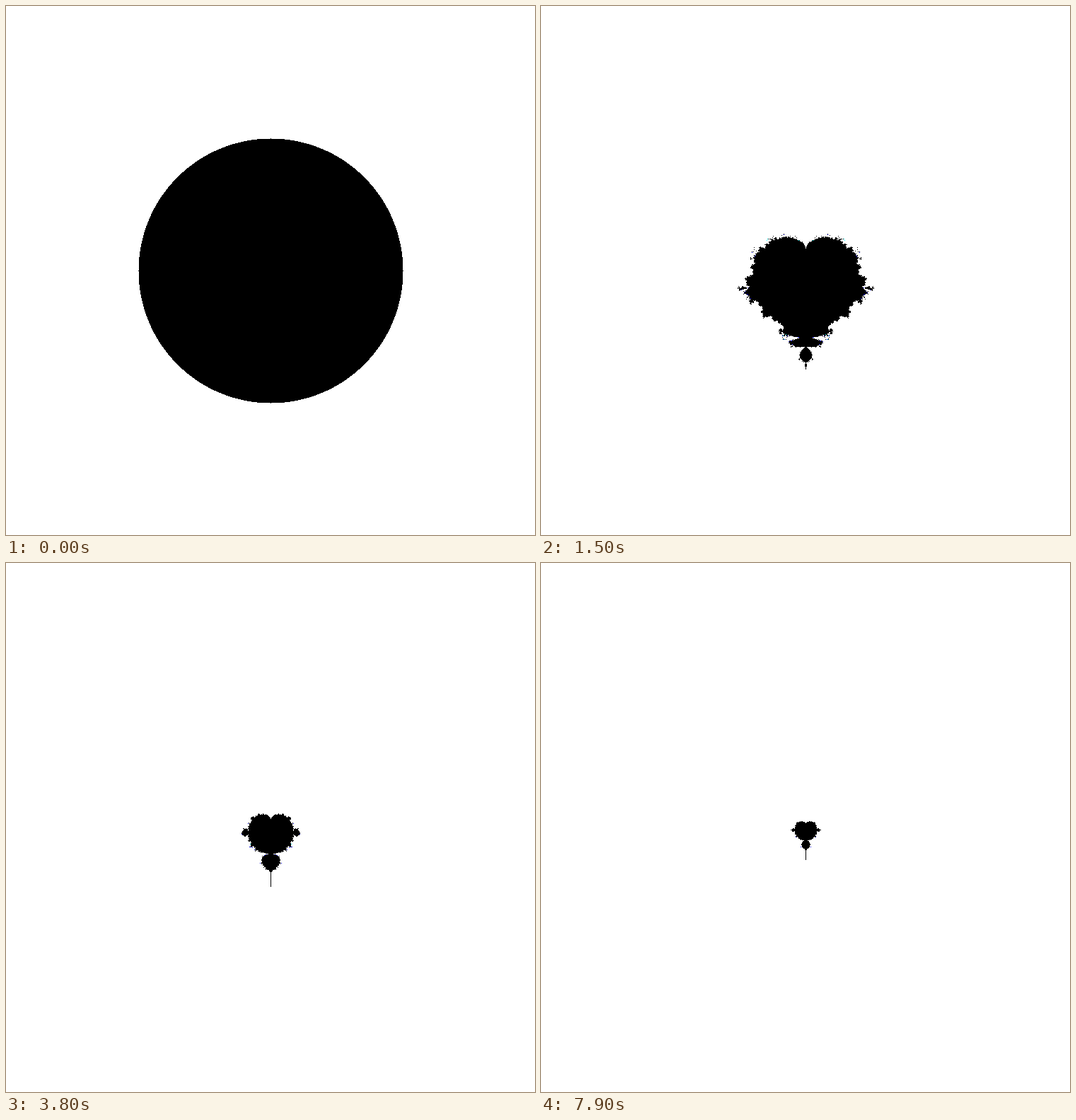
These frames come from a looping animation (748x748 px, 8 s). An HTML page with a canvas:

```html
<!DOCTYPE html>
<html lang="en">
<head>
<meta charset="utf-8">
<title>Disc to Mandelbrot</title>
<style>
  html, body { margin: 0; width: 100%; height: 100%; overflow: hidden; background: #fff; }
  canvas { display: block; width: 748px; height: 748px; }
</style>
</head>
<body>
<canvas id="stage" width="748" height="748"></canvas>
<script>
const SIZE = 748, MID = 374, UNIT = 187;
const LOOP = 8000, STEP = 100;
const RATE = 0.1;
const MAX_ITER = 50, CYAN_FROM = 46, BLUE_FROM = 47;
const REACH = 212;

const WHITE = 0xffffffff, BLACK = 0xff000000;
const CYAN = 0xffffff00, BLUE = 0xffff0000; // ABGR

const ctx = document.getElementById('stage').getContext('2d');
const image = ctx.createImageData(SIZE, SIZE);
const pixels = new Uint32Array(image.data.buffer);

// z -> z^2 + c, started away from the critical point
function escapeTime(x, y, cx, cy) {
  for (let n = 0; n < MAX_ITER; n++) {
    const xx = x * x, yy = y * y;
    if (xx + yy > 4) return n;
    y = 2 * x * y + cy;
    x = xx - yy + cx;
  }
  return MAX_ITER;
}

function colorOf(n) {
  if (n >= MAX_ITER) return BLACK;
  if (n >= BLUE_FROM) return BLUE;
  return n >= CYAN_FROM ? CYAN : WHITE;
}

// The start point is the plane itself; c is the plane turned by 90 degrees and scaled.
function draw(scale) {
  pixels.fill(WHITE);
  for (let dy = -REACH; dy <= REACH; dy++) {
    const row = (MID + dy) * SIZE + MID;
    const y = -dy / UNIT;
    for (let dx = 0; dx <= REACH; dx++) {
      const x = dx / UNIT;
      const color = colorOf(escapeTime(x, y, scale * y, -scale * x));
      pixels[row + dx] = color;
      pixels[row - dx] = color;
    }
  }
  ctx.putImageData(image, 0, 0);
}

const start = performance.now();
let shown = -1;

function tick() {
  const step = Math.floor(((performance.now() - start) % LOOP) / STEP);
  if (step !== shown) {
    shown = step;
    draw(step * RATE);
  }
  requestAnimationFrame(tick);
}
tick();
</script>
</body>
</html>
```
